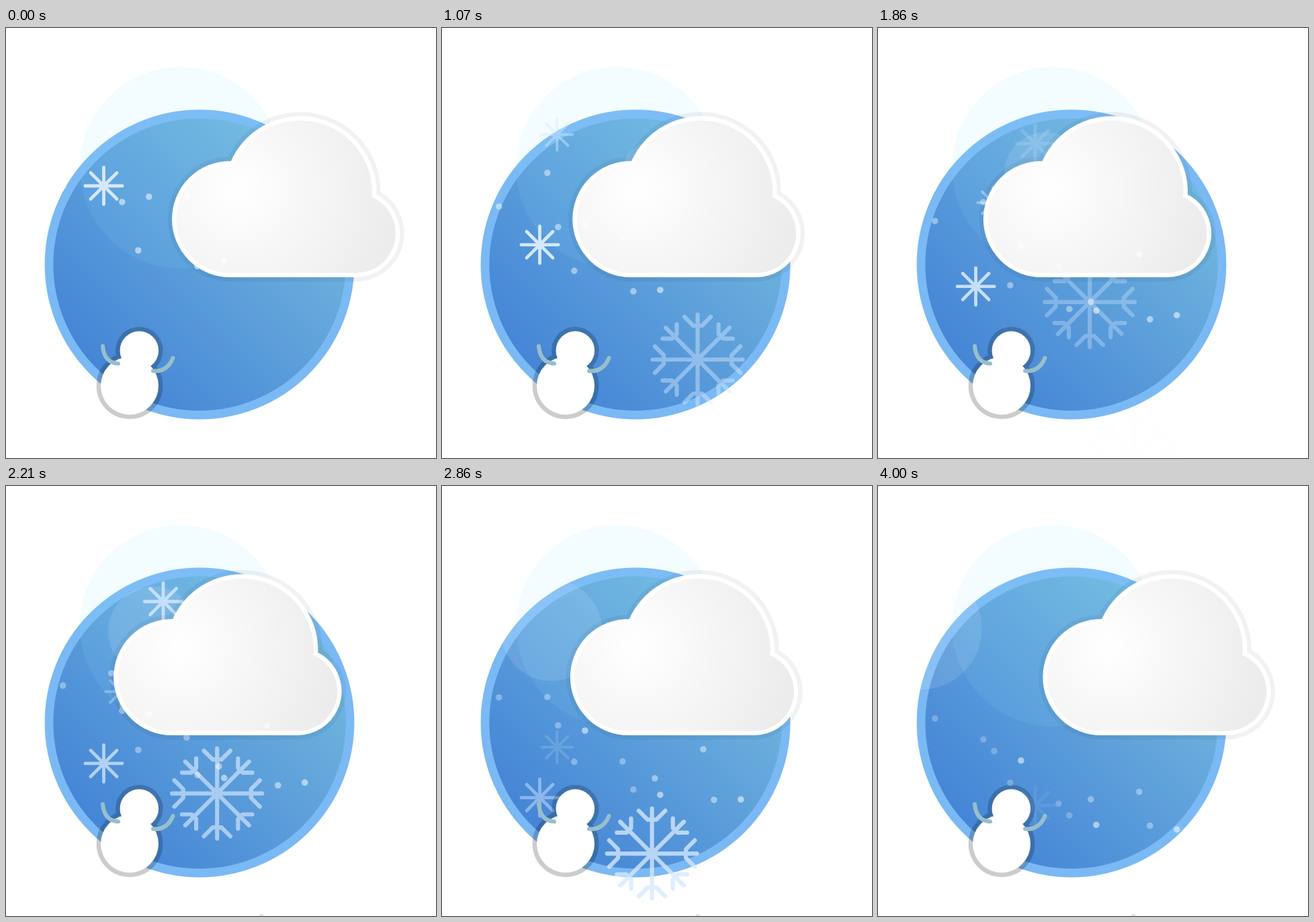
Animation of 640x640 px, one loop 4070 ms. Source, as an HTML page with a canvas:

```html
<!DOCTYPE html>
<html lang="en">
<head>
<meta charset="utf-8">
<title>Snowy weather</title>
<style>
  html, body { margin: 0; width: 100%; height: 100%; overflow: hidden; background: #fff; }
  canvas { display: block; width: 640px; height: 640px; }
</style>
</head>
<body>
<canvas id="stage" width="640" height="640"></canvas>
<script>
const ctx = document.getElementById('stage').getContext('2d');
const LOOP = 4070, FPS = 14, STEPS = 57;
const ICE = '#d6e8ff';
const TAU = Math.PI * 2;

const clamp = v => Math.max(0, Math.min(1, v));
const white = alpha => `rgba(255,255,255,${alpha})`;

function disc(x, y, r, fill) {
  ctx.beginPath();
  ctx.arc(x, y, r, 0, TAU);
  ctx.fillStyle = fill;
  ctx.fill();
}

function drawSky() {
  const g = ctx.createLinearGradient(134, 506, 442, 198);
  g.addColorStop(0, '#4585d6');
  g.addColorStop(1, '#72b8de');
  disc(288, 352, 224, g);
  ctx.strokeStyle = '#7ab9f4';
  ctx.lineWidth = 12.8;
  ctx.stroke();
  disc(260, 208, 150, 'rgba(140,220,255,0.1)');
}

function drawGlow(step) {
  disc(414 - 6.2 * step, 221 - 0.15 * step, 36.5 + 0.96 * step, white(0.11));
}

function drawFlake(x, y, alpha, length, width, branched) {
  ctx.save();
  ctx.translate(x, y);
  ctx.globalAlpha = clamp(alpha);
  ctx.strokeStyle = ICE;
  ctx.lineWidth = width;
  ctx.lineCap = ctx.lineJoin = 'round';
  ctx.beginPath();
  for (let k = 0; k < 8; k++) {
    const angle = k * TAU / 8, c = Math.cos(angle), s = Math.sin(angle);
    const point = (px, py) => [px * c - py * s, px * s + py * c];
    ctx.moveTo(0, 0);
    ctx.lineTo(...point(0, -length));
    if (branched) {
      // Diagonal arms carry smaller branches.
      const scale = k % 2 ? 0.76 : 1;
      const inner = 6.5 * scale, tip = 19.7 * scale;
      ctx.moveTo(...point(-tip, -44 - tip));
      ctx.lineTo(...point(-inner, -44 - inner));
      ctx.lineTo(...point(inner, -44 - inner));
      ctx.lineTo(...point(tip, -44 - tip));
    }
  }
  ctx.stroke();
  ctx.restore();
}

const drawBigFlake = (x, y, alpha) => drawFlake(x, y, alpha, 67, 6.2, true);

const STAR_FALL = 322;
const STARS = [
  { x: 145.5, y: 235, start: 0, duration: 57, size: 27.6, opacity: 1 },
  { x: 171.3, y: 145, start: 14, duration: 35, size: 23, opacity: 0.45 },
  { x: 234, y: 172, start: 32, duration: 26, size: 27.6, opacity: 0.9 }
];

function drawStars(step) {
  for (const { x, y, start, duration, size, opacity } of STARS) {
    const p = clamp((step - start) / duration);
    const fadeIn = clamp((step - start + 7) / 7);
    const fadeOut = clamp((1 - p) / 0.6);
    drawFlake(x, y + STAR_FALL * p, opacity * fadeIn * fadeOut, size, size / 5.75, false);
  }
}

function drawBigFlakes(step) {
  const fall = step / 28;
  if (fall < 1) drawBigFlake(380.5, 292 + 364 * fall, 1 - fall);
  else drawBigFlake(380.5, 706.5, 1);

  const drift = clamp((step - 21) / 32);
  drawBigFlake(316.2 - 6 * drift, 353.3 + 318 * drift, 1 - Math.abs(2 * drift - 1));
}

function drawCloud(step) {
  const sway = 1 - Math.abs(1 - 2 * step / STEPS);
  ctx.save();
  ctx.translate(-97 * sway, 0);
  ctx.beginPath();
  ctx.arc(333.5, 284.5, 83.3, TAU / 4, TAU * 3 / 4);
  ctx.arc(438, 244.5, 110, -2.735, 0.03);
  ctx.arc(521, 305.8, 62, -1.13, TAU / 4);
  ctx.closePath();
  ctx.strokeStyle = 'rgba(0,0,0,0.05)';
  ctx.lineWidth = 19.2;
  ctx.stroke();
  const g = ctx.createRadialGradient(345, 240, 0, 345, 240, 235);
  g.addColorStop(0, '#fff');
  g.addColorStop(1, '#ececec');
  ctx.fillStyle = g;
  ctx.fill();
  ctx.strokeStyle = '#fff';
  ctx.lineWidth = 6.4;
  ctx.stroke();
  ctx.restore();
}

function drawSnowman() {
  ctx.beginPath();
  ctx.arc(184, 532.5, 43, 0, TAU);
  ctx.moveTo(227, 480);
  ctx.arc(198.3, 480, 28.8, 0, TAU);
  ctx.strokeStyle = 'rgba(0,0,0,0.2)';
  ctx.lineWidth = 12.8;
  ctx.stroke();
  ctx.fillStyle = '#fff';
  ctx.fill();

  ctx.strokeStyle = '#97bfcb';
  ctx.lineWidth = 6;
  ctx.lineCap = 'round';
  ctx.beginPath();
  ctx.moveTo(144, 473.5);
  ctx.quadraticCurveTo(146, 498, 167, 499.5);
  ctx.moveTo(248.5, 491);
  ctx.quadraticCurveTo(240, 512, 219, 510.5);
  ctx.stroke();
  ctx.lineCap = 'butt';
}

const DOTS = [
  { x: 85, y: 235.3, speed: 1.96, fade: 0.28 },
  { x: 157, y: 154.6, speed: 3.94, fade: 0.28 },
  { x: 173, y: 259, speed: 2.4, fade: 0.28 },
  { x: 213, y: 251, speed: 2.79, fade: 0 }
];
const FLURRIES = [
  { dx: 0, dy: 0, start: 0 },
  { dx: 112, dy: 95.7, start: 0 },
  { dx: 232, dy: 162.5, start: 21.5 }
];

function drawDots(step) {
  for (const { dx, dy, start } of FLURRIES) {
    const age = step - start;
    if (age < 0) continue;
    for (const { x, y, speed, fade } of DOTS) {
      disc(x + dx - 0.2, y + dy + speed * age, 4.8, white(0.53 - fade * age / STEPS));
    }
  }
}

function render(now) {
  const frame = Math.min(STEPS - 1, Math.floor((now % LOOP + 5) * FPS / 1000));
  // Motion is sampled mid-step, except at rest on the opening frame.
  const step = frame && frame + 0.5;
  ctx.fillStyle = '#fff';
  ctx.fillRect(0, 0, 640, 640);
  drawSky();
  drawGlow(step);
  drawBigFlakes(step);
  drawStars(step);
  drawCloud(step);
  drawSnowman();
  drawDots(step);
}

let origin = null;
function tick(now) {
  origin ??= now;
  render(now - origin);
  requestAnimationFrame(tick);
}
render(0);
requestAnimationFrame(tick);
</script>
</body>
</html>
```
